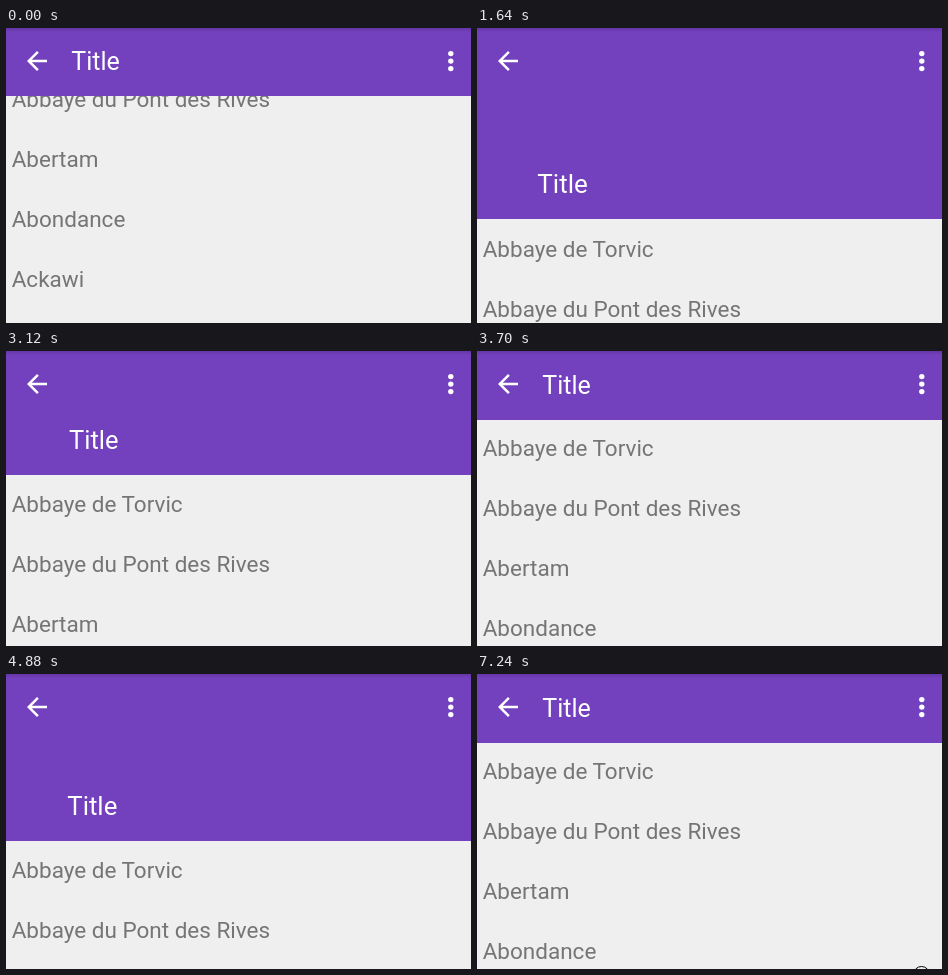
Write an HTML page that moves like this. It is 465 px wide and 295 px high and loops after 7270 ms.

```html
<!DOCTYPE html>
<html lang="en">
<head>
<meta charset="utf-8">
<title>Collapsing toolbar</title>
<style>
  html, body { margin: 0; width: 100%; height: 100%; overflow: hidden; background: #efefef; }
  svg { display: block; font-family: Roboto, sans-serif; }
  #list { font-size: 22.5px; fill: #757575; }
</style>
</head>
<body>
<svg width="465" height="295" viewBox="0 0 465 295">
  <defs>
    <linearGradient id="shade" x2="0" y2="1">
      <stop stop-color="#6436a7"/>
      <stop offset="1" stop-color="#7341bd"/>
    </linearGradient>
  </defs>
  <rect width="465" height="295" fill="#efefef"/>
  <g id="list">
    <text x="5.7">Abbaye de Torvic</text>
    <text x="5.7" y="60">Abbaye du Pont des Rives</text>
    <text x="5.7" y="120">Abertam</text>
    <text x="5.7" y="180">Abondance</text>
    <text x="5.7" y="240">Ackawi</text>
  </g>
  <rect id="bar" width="465" fill="#7341bd"/>
  <rect width="465" height="4" fill="url(#shade)"/>
  <g fill="#fff">
    <path transform="translate(16 18) scale(1.25)"
      d="M20 11H7.83l5.59-5.59L12 4l-8 8 8 8 1.41-1.41L7.83 13H20z"/>
    <circle cx="444.8" cy="25.6" r="2.7"/>
    <circle cx="444.8" cy="33.1" r="2.7"/>
    <circle cx="444.8" cy="40.6" r="2.7"/>
    <text id="title">Title</text>
  </g>
  <circle id="pointer" cx="444.5" cy="300.5" r="8" fill="none" stroke="#000"/>
</svg>
<script>
const LOOP = 7270, TICK = 147.6, LAST_TICK = 49, MIN_BAR = 68;
const [list, bar, title, pointer] =
  ['list', 'bar', 'title', 'pointer'].map(id => document.getElementById(id));

const swing = k => (1 - Math.cos(Math.PI * k)) / 2;
const fling = k => 1 - (1 - k) ** 2;
const mix = (a, b, k) => Math.round(a + (b - a) * k);

// Resting poses: baseline of the first row and pull on the bar
const scrolled = { row: 19, pull: -19 };
const open = { row: 251, pull: 213 };
const closed = { row: 105, pull: 69 };
const partOpen = { row: 217, pull: 179 };

// Drags, with start and end counted in ticks
const drags = [
  { start: 3, end: 13, from: scrolled, to: open, ease: swing },
  { start: 15.6, end: 25, from: open, to: closed, ease: swing },
  { start: 25.8, end: 35, from: closed, to: partOpen, ease: swing },
  { start: 37.1, end: 43, from: partOpen, to: closed, ease: fling }
];

function draw(time) {
  // The screen refreshes only once per tick
  const tick = Math.floor(time % LOOP / TICK);
  const { start, end, from, to, ease } = drags.findLast(d => d.start <= tick) || drags[0];
  const k = ease(Math.min(1, Math.max(0, (tick - start) / (end - start))));
  const height = Math.max(MIN_BAR, mix(from.pull, to.pull, k));
  const growth = (height - MIN_BAR) / 123;

  list.setAttribute('transform', `translate(0 ${mix(from.row, to.row, k)})`);
  bar.setAttribute('height', height);
  title.setAttribute('x', 65.3 - 5 * growth);
  title.setAttribute('y', height - 26);
  title.setAttribute('font-size', 25 + growth);
  pointer.setAttribute('visibility', tick >= LAST_TICK ? 'visible' : 'hidden');
}

const began = performance.now();
function loop() {
  draw(performance.now() - began);
  requestAnimationFrame(loop);
}
loop();
</script>
</body>
</html>
```
